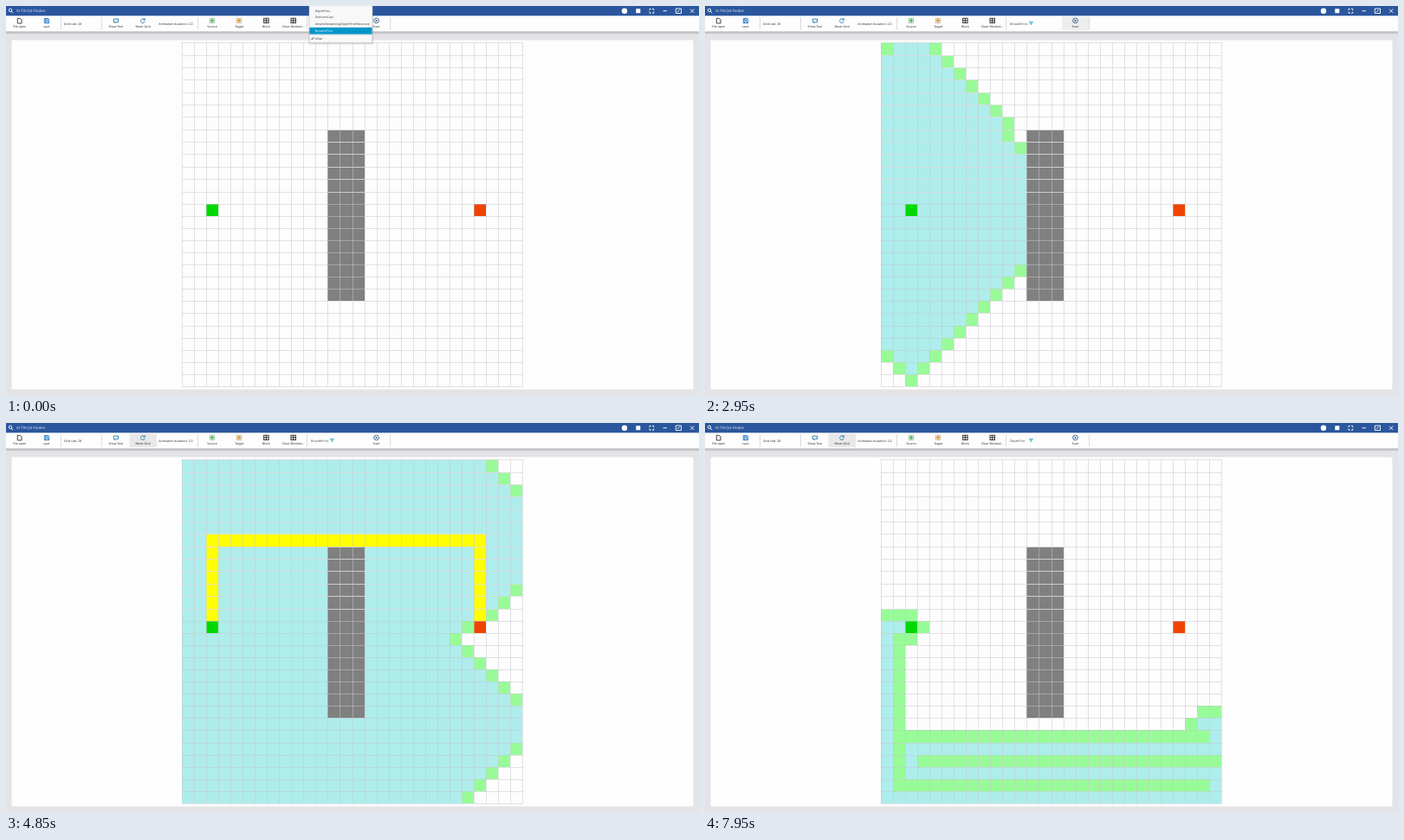
An HTML page with a canvas for the animation above (8000 ms loop, 800 by 450 pixels).

```html
<!DOCTYPE html>
<html lang="en">
<head>
<meta charset="utf-8">
<title>Grid search</title>
<style>
  html, body { margin: 0; width: 100%; height: 100%; overflow: hidden; background: #e4e3e6; }
  #stage { position: absolute; left: 0; top: 0; width: 800px; height: 450px; overflow: hidden; }
  canvas, svg { position: absolute; left: 0; top: 0; display: block; }
  text { font: 3.57px "Open Sans", "Noto Sans", sans-serif; fill: #222; text-rendering: geometricPrecision; }
  .mid { text-anchor: middle; }
  .line { fill: none; stroke-width: .9; }
</style>
</head>
<body>
<div id="stage">
  <canvas id="grid" width="800" height="450"></canvas>
  <svg id="ui" width="800" height="450" viewBox="0 0 800 450">
    <defs>
      <linearGradient id="shade" x2="0" y2="1">
        <stop offset="0" stop-color="#a5a4a9"/>
        <stop offset="1" stop-color="#e4e3e6"/>
      </linearGradient>
    </defs>
    <rect y="29" width="800" height="4" fill="url(#shade)"/>
    <rect y="11" width="800" height="18.5" fill="#fdfdfe"/>
    <rect width="800" height="11.3" fill="#2a569d"/>
    <text x="12.3" y="7.2" style="font-size:4.4px;fill:#e8eefa">KI-TB-Q4-Finden</text>
    <g class="line" stroke="#fff">
      <circle cx="5" cy="4.8" r="1.7"/><path d="M6.2 6l2 2.2"/>
      <path d="M743 5v-1.700h1.700M746 3.300h1.700v1.700M747.700 6.500v1.700h-1.700M744.700 8.200h-1.700v-1.700"/>
      <path d="M758.500 5.700h4.500M790 3.500l4.300 4.300M794.300 3.500l-4.300 4.300"/>
      <path d="M773.300 3h6.200v5.500h-6.200zM775 6.800l2.800-2.300"/>
    </g>
    <circle cx="714" cy="5.700" r="3.200" fill="#fff"/>
    <rect x="727.300" y="3.200" width="5" height="5" fill="#fff"/>

    <rect id="hoverStart" x="412" y="12.500" width="32" height="15.500" fill="#eeeef0"/>
    <rect id="hoverReset" x="142.500" y="12.500" width="31.500" height="15.500" fill="#e8e8ea"/>
    <path d="M63.500 13v14.500M110.500 13v14.500M221.500 13v14.500M347.500 13v14.500M443.500 13v14.500" stroke="#dcdcde"/>

    <g class="line">
      <path d="M13.300 14.300h3l1.700 1.700v4h-4.700z" stroke="#333"/>
      <path d="M44.300 14.500h4.500l.8.800v4.500h-5.300zM45.500 14.500v1.800h2.600v-1.800M45.500 19.800v-2h2.800v2" stroke="#2478c8"/>
      <path d="M124.300 15h5.200v3.500h-2l-1.500 1.300v-1.300h-1.700z" stroke="#2478a8"/>
      <path d="M160 15.800a2.400 2.400 0 1 0 .3 2M160.300 14.200v2h-2" stroke="#2478a8"/>
      <circle cx="427.500" cy="16.900" r="2.900" stroke="#355f8e"/>
    </g>
    <path d="M426.600 15.400l2.600 1.500-2.600 1.500z" fill="#355f8e"/>
    <g id="gridIcons"></g>
    <g id="labels"></g>
    <text x="67" y="21.700">Grid size: 28</text>
    <text x="176.300" y="21.700">Animation duration: 2.0</text>
    <text id="choice" x="352" y="21.500" style="fill:#444"></text>
    <path d="M374.300 18.300h4.200l-2.100 3.500z" fill="#8cd6e2" stroke="#2da2b8" stroke-width=".6"/>

    <g id="menu">
      <rect x="349.500" y="0" width="74.500" height="44.500" rx="1" fill="#000" opacity=".13"/>
      <rect x="350" y="-1" width="73" height="43.700" fill="#f8f8f9" stroke="#bbb" stroke-width=".6"/>
      <path d="M351 33.400h71" stroke="#d4d4d6" stroke-width=".6"/>
      <rect id="mark" x="350.300" width="72.300" height="7.800" fill="#0096c9"/>
      <g id="items"></g>
      <path id="check" d="M-1.500 0l1 1.100 1.900-2.600" class="line" stroke="#333"/>
    </g>
  </svg>
</div>
<script>
const $ = id => document.getElementById(id);
const ctx = $('grid').getContext('2d');
const LOOP = 8000, STEP = 50;
const SIZE = 28, PITCH = 14.06, LEFT = 203.2;
const SOURCE = 13 * SIZE + 2, TARGET = 13 * SIZE + 24;
const MENU = ['DepthFirst', 'UniformCost', 'IterativDeepeningDepthFirstRekursive', 'BreadthFirst', 'AStar'];
const MENU_Y = [6.6, 14.4, 22.1, 30, 38.8];

const colX = c => Math.floor(LEFT + c * PITCH);
// The upper rows sit slightly further apart than the lower ones.
const rowY = r => Math.floor(r <= 13 ? 42.8 + r * 14.35 : 229.4 + (r - 13) * PITCH);
const blocked = (c, r) => c >= 12 && c <= 14 && r >= 7 && r <= 20;

function add(parent, tag, attrs, content = '') {
  const el = document.createElementNS('http://www.w3.org/2000/svg', tag);
  for (const key in attrs) el.setAttribute(key, attrs[key]);
  el.textContent = content;
  return parent.appendChild(el);
}

[['File open', 15.7], ['save', 46.7], ['Show Text', 126.8], ['Reset Grid', 158], ['Source', 238], ['Target', 269.3],
 ['Block', 300.4], ['Clear Blocked...', 331.6], ['Start', 427.5]]
  .forEach(([label, x]) => add($('labels'), 'text', { x, y: 25, class: 'mid' }, label));

[[238, '#42c34b'], [269, '#ee9428'], [300.4, '#222'], [331.7, '#222']].forEach(([x, color], i) => {
  const frame = i < 2 ? '#bbb' : color;
  add($('gridIcons'), 'rect', { x: x - 2.7, y: 14.2, width: 5.4, height: 5.4, class: 'line', stroke: frame });
  add($('gridIcons'), 'path', { d: `M${x - 2.7} 16.9h5.4M${x} 14.2v5.4`, class: 'line', stroke: color });
  if (i < 2) add($('gridIcons'), 'rect', { x: x - 1.4, y: 15.5, width: 2.8, height: 2.8, fill: color });
});

const items = MENU.map((name, i) => add($('items'), 'text', { x: 356.7, y: MENU_Y[i] }, name));

// Records at which expansion each cell is found and when it is expanded.
function search(takeLast) {
  const found = new Map([[SOURCE, 0]]), expanded = new Map(), parent = new Map();
  const open = [SOURCE];
  let count = 0;
  while (open.length && !found.has(TARGET)) {
    const cell = takeLast ? open.pop() : open.shift();
    expanded.set(cell, ++count);
    const c0 = cell % SIZE, r0 = Math.floor(cell / SIZE);
    for (const [dc, dr] of [[0, -1], [1, 0], [0, 1], [-1, 0]]) {
      const c = c0 + dc, r = r0 + dr, next = r * SIZE + c;
      if (c < 0 || r < 0 || c >= SIZE || r >= SIZE || blocked(c, r) || found.has(next)) continue;
      found.set(next, count);
      parent.set(next, cell);
      open.push(next);
      if (next === TARGET) break;
    }
  }
  const path = new Set();
  for (let cell = TARGET; cell !== undefined; cell = parent.get(cell)) path.add(cell);
  return { found, expanded, path, count };
}

const runs = [
  { ...search(false), from: 1990, to: 5750, pace: [[1989, 0], [2050, 15.5], [2950, 237.5], [3800, 444.5], [4800, 691]] },
  { ...search(true), from: 7540, to: LOOP, pace: [[7538, 0], [7950, 101.5]] }
];

// [time, highlighted item or -1 for closed, checked item]
const menuSteps = [[0, 3, 4], [1450, -1, 3], [5950, 3, 3], [6100, 2, 3], [6600, 1, 3], [6800, 0, 3], [7300, -1, 0]];
const hoverSteps = [[0, ''], [1700, 'Start'], [3500, ''], [3900, 'Reset'], [5850, ''], [7450, 'Start'], [7750, ''], [7850, 'Reset']];

const current = (steps, t) => steps.filter(s => s[0] <= t).pop();

function interpolate(keys, t) {
  const i = Math.max(1, keys.findIndex(k => k[0] >= t));
  if (t >= keys[keys.length - 1][0]) return keys[keys.length - 1][1];
  const [t0, a] = keys[i - 1], [t1, b] = keys[i];
  return a + (b - a) * (t - t0) / (t1 - t0);
}

function cellColor(cell, run, n) {
  if (cell === SOURCE) return '#00d900';
  if (cell === TARGET) return '#ee4400';
  if (blocked(cell % SIZE, Math.floor(cell / SIZE))) return '#808080';
  if (!run) return null;
  if (n >= run.count && run.path.has(cell)) return '#ffff00';
  if (run.expanded.get(cell) <= n) return '#aeedec';
  return n > 0 && run.found.get(cell) <= n ? '#98fb98' : null;
}

function drawGrid(t) {
  ctx.fillStyle = '#e4e3e6';
  ctx.fillRect(0, 0, 800, 450);
  ctx.fillStyle = '#fdfdfe';
  ctx.beginPath();
  ctx.roundRect(6.5, 39.5, 787, 404, 1.5);
  ctx.fill();

  const run = runs.find(r => t >= r.from && t < r.to);
  const n = run ? Math.floor(interpolate(run.pace, t)) : 0;
  for (let cell = 0; cell < SIZE * SIZE; cell++) {
    const color = cellColor(cell, run, n);
    if (!color) continue;
    const c = cell % SIZE, r = Math.floor(cell / SIZE);
    ctx.fillStyle = color;
    ctx.fillRect(colX(c), rowY(r), colX(c + 1) - colX(c), rowY(r + 1) - rowY(r));
  }

  const width = colX(SIZE) - LEFT + 1, top = rowY(0), height = rowY(SIZE) - top;
  for (let i = 0; i <= SIZE; i++) {
    if (i < 13) {
      ctx.fillStyle = 'rgba(255,255,255,.65)';
      ctx.fillRect(colX(0), rowY(i), width, 1);
    }
    ctx.fillStyle = 'rgba(200,200,205,.52)';
    ctx.fillRect(colX(0), rowY(i), width, 1);
    ctx.fillRect(colX(i), top, 1, height);
  }
}

function drawUi(t) {
  const [, lit, checked] = current(menuSteps, t);
  const hover = current(hoverSteps, t)[1];
  const show = (id, on) => $(id).setAttribute('visibility', on ? 'visible' : 'hidden');
  show('hoverStart', hover === 'Start');
  show('hoverReset', hover === 'Reset');
  $('choice').textContent = MENU[checked];
  $('menu').style.display = lit < 0 ? 'none' : '';
  if (lit < 0) return;
  $('mark').setAttribute('y', MENU_Y[lit] - 5.2);
  $('check').setAttribute('transform', `translate(353.800 ${MENU_Y[checked] - 1.1})`);
  $('check').style.stroke = lit === checked ? '#fff' : '#333';
  items.forEach((el, i) => { el.style.fill = i === lit ? '#fff' : '#333'; });
}

const began = performance.now();
let last = -1;
function tick() {
  const t = Math.floor((performance.now() - began) % LOOP / STEP) * STEP;
  if (t !== last) {
    last = t;
    drawGrid(t);
    drawUi(t);
  }
  requestAnimationFrame(tick);
}
tick();
</script>
</body>
</html>
```
